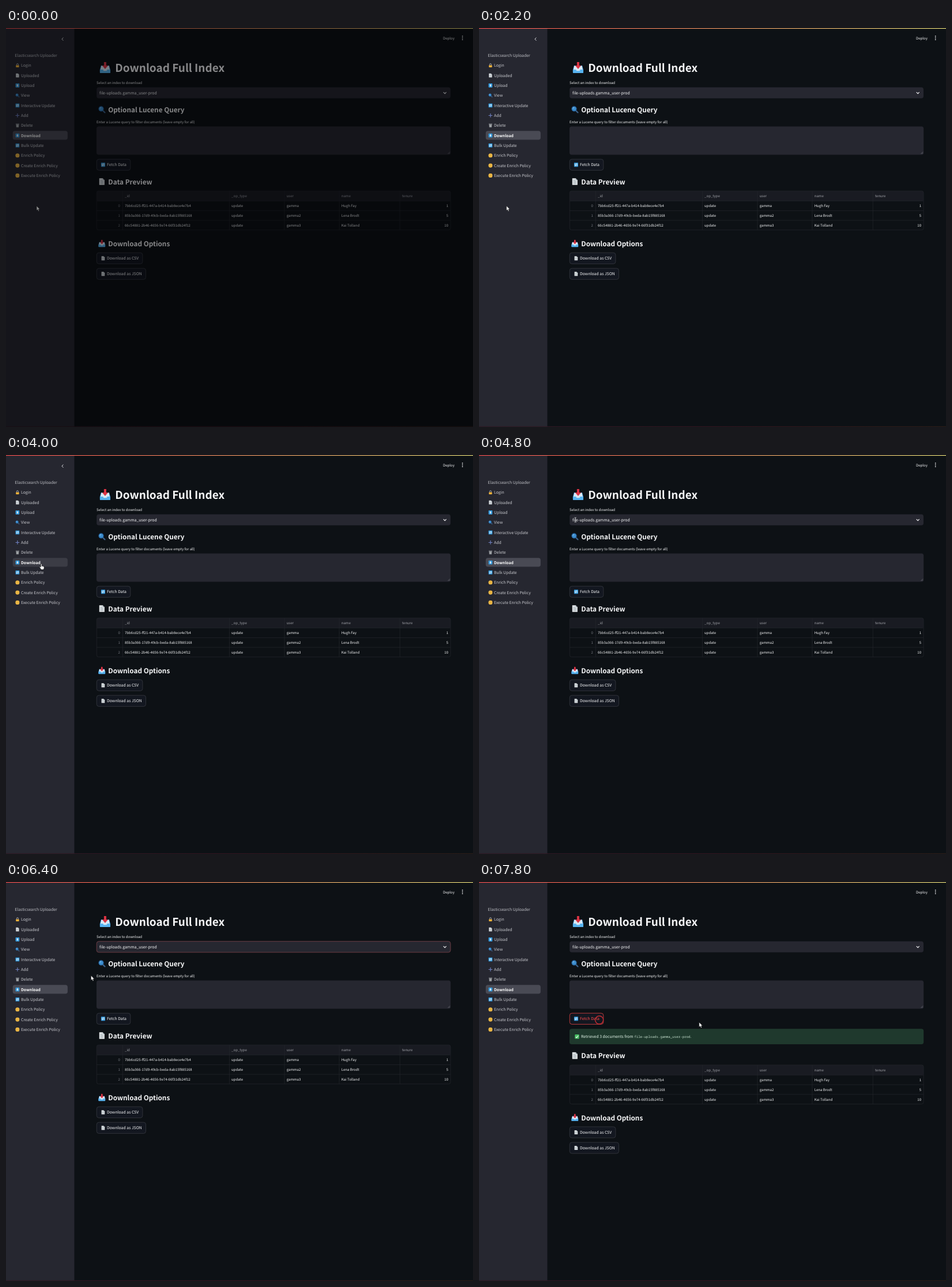
An HTML page that plays this animation: 810 by 691 pixels, repeating every 8 s.

```html
<!DOCTYPE html>
<html lang="en">
<head>
<meta charset="utf-8">
<title>Download Full Index</title>
<style>
  html, body { margin: 0; width: 100%; height: 100%; overflow: hidden; background: #0d1115; }
  svg { display: block; }
  text {
    font-family: "Noto Sans CJK JP", "Noto Sans CJK SC", "Noto Sans CJK", "Open Sans", sans-serif;
    text-rendering: geometricPrecision;
    white-space: pre;
  }
  .mono { font-family: "Noto Sans Mono", "DejaVu Sans Mono", monospace; }
</style>
</head>
<body>
<svg id="stage" width="810" height="691" viewBox="0 0 810 691">
  <defs>
    <linearGradient id="topBar"><stop stop-color="#f04b4b"/><stop offset="1" stop-color="#e8dc78"/></linearGradient>
    <linearGradient id="bottomBar"><stop stop-color="#2c1a24"/><stop offset=".5" stop-color="#30151f"/><stop offset="1" stop-color="#2a1d18"/></linearGradient>
    <symbol id="tray" viewBox="0 0 20 20">
      <path d="M3 6h14l2 7v5q0 1-1 1H2q-1 0-1-1v-5z" fill="#3d9be0"/>
      <path d="M3.4 6.5h13.2l1.4 6.5h-4l-1.5 2.5h-5L6 13H2z" fill="#d9e9f5"/>
      <path d="M1 13h5l1.5 2.5h5L14 13h5v5q0 1-1 1H2q-1 0-1-1z" fill="#58b4f0"/>
      <path d="M8 0h4v6h3.2L10 12 4.8 6H8z" fill="#dc3444"/>
    </symbol>
    <symbol id="page" viewBox="0 0 20 20">
      <path d="M3 1h9l5 5v13H3z" fill="#e4e8ea"/>
      <path d="M12 1l5 5h-5z" fill="#9aa6ad"/>
      <path d="M5.5 6h5M5.5 9h9M5.5 12h9M5.5 15h9" stroke="#86939b" stroke-width="1.1"/>
    </symbol>
    <symbol id="lens" viewBox="0 0 20 20">
      <path d="M12 12l6 6" stroke="#3b5f87" stroke-width="3.6" stroke-linecap="round"/>
      <circle cx="8" cy="8" r="6.3" fill="#3e8fd0" stroke="#225c94" stroke-width="1.8"/>
      <path d="M4.5 7.5q.8-3 3.6-3.4" stroke="#9bd0f4" stroke-width="1.5" fill="none"/>
    </symbol>
    <symbol id="lock" viewBox="0 0 20 20">
      <path d="M6 10V6a4 4 0 0 1 8 0v4" fill="none" stroke="#b8bdc2" stroke-width="2.4"/>
      <rect x="3" y="9" width="14" height="10" rx="2" fill="#f0b23a"/>
    </symbol>
    <symbol id="up" viewBox="0 0 20 20">
      <rect x="1" y="1" width="18" height="18" rx="2" fill="#3399dc"/>
      <path d="M10 4l5 6h-3.3v6H8.3v-6H5z" fill="#fff"/>
    </symbol>
    <symbol id="down" viewBox="0 0 20 20">
      <rect x="1" y="1" width="18" height="18" rx="2" fill="#3399dc"/>
      <path d="M10 16l5-6h-3.3V4H8.3v6H5z" fill="#fff"/>
    </symbol>
    <symbol id="sync" viewBox="0 0 20 20">
      <rect x="1" y="1" width="18" height="18" rx="2" fill="#3399dc"/>
      <path d="M5 10V7h8M15 10v3H7" fill="none" stroke="#fff" stroke-width="2"/>
      <path d="M12 3.5l4 3.5-4 3.5zM8 9.5L4 13l4 3.5z" fill="#fff"/>
    </symbol>
    <symbol id="plus" viewBox="0 0 20 20"><path d="M10 1v18M1 10h18" stroke="#7182c4" stroke-width="3"/></symbol>
    <symbol id="bin" viewBox="0 0 20 20">
      <path d="M3 4h14l-1.5 15h-11z" fill="#85898d"/>
      <path d="M2 3h16M7 7v9M10 7v9M13 7v9" stroke="#c3c6c9" stroke-width="1.5"/>
    </symbol>
    <symbol id="dot" viewBox="0 0 20 20"><circle cx="10" cy="10" r="9.5" fill="#e9b544"/></symbol>
    <symbol id="check" viewBox="0 0 20 20">
      <rect x="1" y="1" width="18" height="18" rx="2" fill="#48bf63"/>
      <path d="M4.5 10.5l4 4 7-9" fill="none" stroke="#fff" stroke-width="2.5"/>
    </symbol>
  </defs>
  <g id="scene"></g>
  <rect id="shade" width="810" height="691" fill="#000203"/>
</svg>
<script>
const LOOP = 8000, STEP = 200, SHIFT = 34.7;
const INDEX = "file-uploads.gamma_user-prod";
const BG = "#0d1115", PANEL = "#262730", WHITE = "#f6f7f8", RED = "#ff4b4b";

const text = (x, y, s, size = 6.9, fill = WHITE, extra = "") =>
  `<text x="${x}" y="${y}" font-size="${size}" fill="${fill}" ${extra}>${s}</text>`;
const rect = (x, y, w, h, fill, extra = "") =>
  `<rect x="${x}" y="${y}" width="${w}" height="${h}" fill="${fill}" ${extra}/>`;
const icon = (id, cx, cy, size) =>
  `<use href="#${id}" x="${cx - size / 2}" y="${cy - size / 2}" width="${size}" height="${size}"/>`;
const heading = (id, cy, s) =>
  icon(id, 166.3, cy, 13) + text(177.3, cy + 4.8, s, 11.75, WHITE, 'font-weight="700"');
const button = (y, w, id, s, name) =>
  rect(157.3, y, w, 19.2, "#131720", `rx="3.8" stroke="#3d4047" stroke-width=".7" id="${name}Box"`) +
  icon(id, 168.4, y + 9.6, 8) + text(175, y + 12.1, s, 6.88, WHITE, `id="${name}Text"`);

const menu = [
  ["lock", "Login"], ["page", "Uploaded"], ["up", "Upload"], ["lens", "View"],
  ["sync", "Interactive Update"], ["plus", "Add"], ["bin", "Delete"], ["down", "Download"],
  ["sync", "Bulk Update"], ["dot", "Enrich Policy"], ["dot", "Create Enrich Policy"],
  ["dot", "Execute Enrich Policy"]
];

function sidebar() {
  const items = menu.map(([id, label], i) => {
    const y = 64.8 + i * 17.33, active = label === "Download";
    return icon(id, 19.9, y, 7.6) + text(26, y + 2.5, label, active ? 6.75 : 6.9,
      active ? "#fff" : "#c9cacf", active ? 'font-weight="700"' : "");
  }).join("");
  return rect(0, 0, 118.5, 691, PANEL) +
    '<path id="collapse" d="M99.4 16.6L96.9 19.2l2.5 2.6" fill="none" stroke="#e4e5e8" stroke-width="1"/>' +
    text(15.2, 50.2, "Elasticsearch Uploader", 6.9, "#bfc0c6") +
    rect(11.7, 178.3, 95.2, 15.2, "#494a54", 'rx="3.8" id="pill"') + items;
}

function form() {
  return text(758, 19.8, "Deploy", 6.1, WHITE, 'font-weight="500"') +
    [14.2, 17.2, 20.2].map(y => `<circle cx="791.7" cy="${y}" r=".85" fill="${WHITE}"/>`).join("") +
    icon("tray", 171.9, 69, 20) +
    text(189.2, 75.9, "Download Full Index", 18.95, WHITE, 'font-weight="700"') +
    text(157, 97.4, "Select an index to download", 6.03) +
    rect(157.2, 102.8, 613.8, 19, PANEL, 'rx="3.8" stroke-width=".8" id="select"') +
    text(162, 114.9, INDEX) +
    `<path d="M758.7 111.2l2.5 2.5 2.5-2.5" fill="none" stroke="${WHITE}" stroke-width="1.1"/>` +
    heading("lens", 141.3, "Optional Lucene Query") +
    text(157, 165.1, "Enter a Lucene query to filter documents (leave empty for all)", 6.03) +
    rect(157, 170.5, 614.2, 49, PANEL, 'rx="3.8"') +
    '<path d="M766.5 218l3.5-3.5M768.6 218l1.4-1.4" stroke="#85868c" stroke-width=".6"/>' +
    button(227.2, 58.5, "sync", "Fetch Data", "fetch");
}

function table() {
  const columns = [[202.3, "_id"], [387.4, "_op_type"], [483, "user"], [578, "name"], [683.2, "tenure"]];
  const rows = [
    ["7bb6cd25-ff21-447a-b414-bab8ece4e7b4", "update", "gamma", "Hugh Fay", 1],
    ["85b3a366-17d9-49cb-beda-8ab15f885168", "update", "gamma2", "Lena Brodt", 5],
    ["66c54881-2b46-4656-9e74-66f31db24f12", "update", "gamma3", "Kai Tolland", 10]
  ];
  const line = "#24272d";
  let out = rect(157.3, 282.2, 613.8, 17.4, "#191b22", 'rx="3"');
  columns.forEach(([x, label]) => {
    out += `<path d="M${x} 282.2V349.8" stroke="${line}" stroke-width=".7"/>` +
      text(x + 3.7, 293.4, label, 6.05, "#a0a2a8");
  });
  rows.forEach((row, i) => {
    const y = 310.4 + i * 16.75;
    out += `<path d="M157.3 ${y - 10.8}H771" stroke="${line}" stroke-width=".7"/>` +
      text(197.8, y, i, 6.05, "#777a81", 'text-anchor="end"');
    row.forEach((value, c) => {
      out += c === 4 ? text(767, y, value, 6.05, WHITE, 'text-anchor="end"')
                     : text(columns[c][0] + 3.7, y, value, 6.05);
    });
  });
  return out + rect(157.3, 282.2, 613.8, 67.6, "none", `rx="3.4" stroke="${line}" stroke-width=".7"`);
}

const alertBox = () =>
  rect(157, 254.3, 614.2, 26.8, "#1f392d", 'rx="3.8"') + icon("check", 170, 267.8, 8.2) +
  text(177, 270.4, "Retrieved 3 documents from", 6.88, "#e4f6ea") +
  text(269.2, 270.2, INDEX, 5.8, "#c3dccb", 'class="mono"') + text(366.4, 270.4, ".", 6.88, "#e4f6ea");

const cursors = `
  <g id="arrow"><path d="M0 0v8.2l1.9-1.7 1.3 2.9 1.5-.7-1.3-2.8h2.5z" fill="#fff" stroke="#101114" stroke-width=".6"/></g>
  <g id="hand"><path d="M-.9.9q0-1 .9-1t.9 1v3.3l.3-.2q1-.4 1.3.5 1-.5 1.3.4 1.1-.2 1.1.9v1.7q0 2.8-2.8 2.8H.8q-1.2 0-2-1.5l-1.7-2.8q-.3-1 .6-1.1.7 0 1.4 1z" fill="#fff" stroke="#101114" stroke-width=".6"/></g>
  <g id="beam"><path d="M-1.6-4.2q1.6 0 1.6 1.1v6.2q0 1.1-1.6 1.1M1.6-4.2Q0-4.2 0-3.1M0 3.1q0 1.1 1.6 1.1" fill="none" stroke="#d5d6d9" stroke-width=".8"/></g>`;

const $ = id => document.getElementById(id);
$("scene").innerHTML =
  rect(0, 0, 810, 691, BG) + sidebar() + form() +
  `<g id="alert">${alertBox()}</g><g id="results">` +
  heading("page", 266, "Data Preview") + table() + heading("tray", 373.3, "Download Options") +
  button(389.2, 79.6, "page", "Download as CSV", "csv") +
  button(416.2, 85.2, "page", "Download as JSON", "json") + "</g>" +
  rect(0, 0, 810, 1.2, "url(#topBar)") + rect(0, 689.8, 810, 1.2, "url(#bottomBar)") +
  '<circle id="ring" cx="208.6" cy="239" r="7" fill="none" stroke="#c92d32" stroke-width="1.3"/>' +
  `<g id="pointer">${cursors}</g>`;

// Pointer waypoints: time, x, y
const path = [
  [0, 53, 308], [2000, 53, 308], [2200, 47.6, 308], [3200, 61.2, 188.3], [4000, 61.2, 188.3],
  [4400, 122, 146], [4800, 167.2, 112.3], [5400, 167.2, 112.3], [6200, 147.4, 161],
  [6400, 147.4, 162], [7000, 208, 237], [7400, 208, 237], [7800, 381.8, 243], [LOOP, 381.8, 243]
];

function pointerAt(t) {
  const i = path.findIndex((p, k) => k + 1 < path.length && t < path[k + 1][0]);
  const [t0, x0, y0] = path[i], [t1, x1, y1] = path[i + 1];
  const u = (t - t0) / (t1 - t0), e = u * u * (3 - 2 * u);
  return [x0 + (x1 - x0) * e, y0 + (y1 - y0) * e];
}

const show = (id, on) => $(id).setAttribute("display", on ? "inline" : "none");
const inside = (x, y, l, t, r, b) => x >= l && x <= r && y >= t && y <= b;

function draw(t) {
  const [x, y] = pointerAt(t);
  const onMenu = inside(x, y, 12, 56, 107, 264);
  const onFetch = inside(x, y, 157, 227, 216, 247);
  const onField = inside(x, y, 157, 102, 771, 122) || inside(x, y, 157, 170, 771, 220);
  $("pointer").setAttribute("transform", `translate(${x} ${y})`);
  show("hand", onMenu || onFetch);
  show("beam", onField);
  show("arrow", !onMenu && !onFetch && !onField);

  show("collapse", t < 4400);
  $("pill").setAttribute("fill", inside(x, y, 12, 178, 107, 194) ? "#3b3c45" : "#494a54");
  $("select").setAttribute("stroke", t >= 5400 && t < 6400 ? RED : t === 6400 ? "#80454c" : "none");

  const hot = onFetch || t >= 7000;
  $("fetchBox").setAttribute("stroke", hot ? RED : "#3d4047");
  $("fetchText").setAttribute("fill", hot ? RED : WHITE);
  show("ring", t >= 7200);

  const done = t >= 7600;
  show("alert", done);
  $("results").setAttribute("transform", `translate(0 ${done ? SHIFT : 0})`);
  $("shade").setAttribute("opacity", t < 200 ? 0.46 : t < 400 ? 0.02 : 0);
}

const start = performance.now();
function tick() {
  const t = (performance.now() - start) % LOOP;
  draw(Math.floor(t / STEP) * STEP);
  requestAnimationFrame(tick);
}
tick();
</script>
</body>
</html>
```
